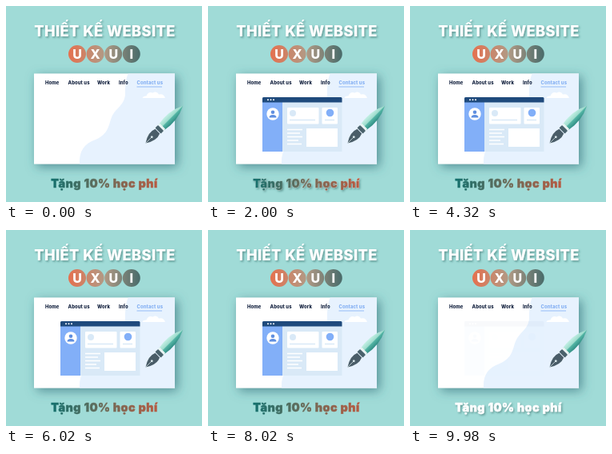
Write an HTML page that moves like this. It is 245 px wide and 245 px high and loops after 10000 ms.

```html
<!DOCTYPE html>
<html lang="vi">
<head>
<meta charset="utf-8">
<style>
  html, body { margin: 0; width: 100%; height: 100%; overflow: hidden; background: #a0dbd7; }
  svg { display: block; width: 100vw; height: 100vh; }
  text { font-family: Inter, "Open Sans", sans-serif; }
  .title { font-size: 18.2px; font-weight: 800; letter-spacing: .4px; fill: #fff; text-anchor: middle; }
  .offer { font-size: 14.3px; font-weight: 900; letter-spacing: .5px; stroke-width: .4; text-anchor: middle; }
  .nav { font-size: 5.9px; font-weight: 800; letter-spacing: .1px; fill: #14223f; }
  .badge { font-size: 16px; font-weight: 800; fill: #fff; text-anchor: middle; }
</style>
</head>
<body>
<svg viewBox="0 0 245 245">
  <defs>
    <linearGradient id="badgeFill" gradientUnits="userSpaceOnUse" x1="78" y1="0" x2="168" y2="0">
      <stop stop-color="#e5714f"/><stop offset=".5" stop-color="#b19a85"/><stop offset="1" stop-color="#486b6a"/>
    </linearGradient>
    <linearGradient id="offerFill" gradientUnits="userSpaceOnUse" x1="54" y1="0" x2="192" y2="0">
      <stop stop-color="#10706e"/><stop offset=".5" stop-color="#6d6b58"/><stop offset="1" stop-color="#b95a41"/>
    </linearGradient>
    <linearGradient id="penFill" x1="0" x2="1">
      <stop stop-color="#c4f0e5"/><stop offset=".45" stop-color="#9edccd"/>
      <stop offset=".55" stop-color="#54b5a5"/><stop offset="1" stop-color="#2f8c83"/>
    </linearGradient>
    <filter id="textShadow" x="-20%" y="-50%" width="140%" height="200%">
      <feDropShadow dx="1.4" dy="1.6" stdDeviation="1.1" flood-color="#23514f" flood-opacity=".5"/>
    </filter>
    <filter id="cardShadow" x="-20%" y="-25%" width="140%" height="150%">
      <feDropShadow dx="3.5" dy="3.5" stdDeviation="6.5" flood-color="#316f7c" flood-opacity=".7"/>
    </filter>
    <clipPath id="cardClip"><rect x="35" y="84.500" width="176" height="113"/></clipPath>
    <clipPath id="windowClip"><rect x="66" y="100" width="104" height="82.500"/></clipPath>
  </defs>

  <rect width="245" height="245" fill="#a0dbd7"/>
  <text class="title" x="123.500" y="38" filter="url(#textShadow)">THIẾT KẾ WEBSITE</text>
  <g id="badges"></g>

  <rect x="35" y="84.500" width="176" height="113" fill="#fff" filter="url(#cardShadow)"/>
  <g clip-path="url(#cardClip)">
    <path d="M92 198C91 181 98 172 112 167C128 160 128 150 132 139C137 127 149 124 149 109C149 98 150 90 153 84H211V198Z" fill="#e7f2fe"/>
    <path d="M170.500 115q1-3 5-2.500q2-6 8-4q5-2.500 7.500 2q6-1.500 8 4.500z" fill="#fff"/>
  </g>
  <g id="nav"></g>
  <path d="M163.500 101H195" stroke="#8cb5f4" stroke-width=".9"/>

  <g clip-path="url(#windowClip)">
    <g id="window">
      <rect x="68" y="114" width="99.500" height="68" fill="#d9e9f7"/>
      <rect x="68" y="120" width="25" height="62" fill="#82aff8"/>
      <path d="M68 120.500v-5q0-1.500 1.500-1.500h96.500q1.500 0 1.500 1.500v5z" fill="#1f4a7c"/>
      <g fill="#fff">
        <circle cx="75" cy="117.300" r="1"/><circle cx="78.500" cy="117.300" r="1"/><circle cx="82" cy="117.300" r="1"/>
        <circle cx="81" cy="135" r="7.700"/>
        <rect x="99" y="127" width="39.500" height="20.500" rx="1"/>
        <rect x="142.500" y="127" width="19.500" height="20.500" rx="1"/>
        <rect x="123" y="153" width="39" height="23"/>
      </g>
      <g fill="#5f8fe0">
        <circle cx="81" cy="132.800" r="2.300"/>
        <path d="M76.500 139.500q0-3.500 4.500-3.500t4.500 3.500z"/>
      </g>
      <circle cx="106" cy="134" r="4" fill="#d9e9f7"/>
      <path d="M102 142.500h32M146 142.500h12" stroke="#d9e9f7" stroke-width="1.500"/>
      <circle cx="152.500" cy="133.500" r="4.800" fill="#82aff8"/>
      <path d="M99 154.500h19M99 159h16M99 163.500h19M99 168h14M99 172.500h18" stroke="#fff" stroke-width="1.400"/>
    </g>
  </g>

  <g transform="translate(174.500 171.500) rotate(45)">
    <path d="M-5-28Q-9-48 0-66Q9-48 5-28Z" fill="url(#penFill)"/>
    <rect x="-5" y="-30" width="10" height="3" rx=".8" fill="#e9f4f3"/>
    <rect x="-5" y="-27" width="10" height="5" rx=".8" fill="#4a626c"/>
    <path d="M-4-21H4Q8-12 0 0Q-8-12-4-21Z" fill="#4a5d68"/>
    <path d="M0-10V0" stroke="#dceaed" stroke-width=".7"/>
    <circle cy="-11" r="1.400" fill="#dceaed"/>
  </g>

  <text id="offerWhite" class="offer" x="123" y="227" fill="#fff" stroke="#fff" filter="url(#textShadow)">Tặng 10% học phí</text>
  <text id="offerColor" class="offer" x="123" y="227" fill="url(#offerFill)" stroke="url(#offerFill)">Tặng 10% học phí</text>
</svg>
<script>
  const LOOP = 10000;
  const $ = selector => document.querySelector(selector);
  const clamp = x => Math.min(1, Math.max(0, x));
  const span = (t, from, to) => clamp((t - from) / (to - from));
  const smooth = x => x * x * (3 - 2 * x);

  $('#badges').innerHTML = [...'UXUI'].map((letter, i) => {
    const x = 89 + i * 22.6;
    return `<circle cx="${x}" cy="60" r="11" fill="url(#badgeFill)"/>
      <text class="badge" x="${x}" y="65.800">${letter}</text>`;
  }).join('');

  $('#nav').innerHTML = [['Home', 49], ['About us', 77.5], ['Work', 114], ['Info', 141], ['Contact us', 163.5]]
    .map(([label, x], i) => `<text class="nav" x="${x}" y="98"${i === 4 ? ' style="fill:#86b1f3"' : ''}>${label}</text>`)
    .join('');

  function render(t) {
    // The offer alternates between colour and white each second.
    const beat = t % 2000;
    const colored = beat < 1020;
    const blend = t >= 2000 && t < 2020;
    $('#offerColor').setAttribute('opacity', colored ? 1 : 0);
    $('#offerWhite').setAttribute('opacity', !colored || blend ? 1 : 0);

    // The window rises into the card, then fades before the loop restarts.
    const rise = smooth(Math.pow(span(t, 520, 1780), 1.6));
    $('#window').setAttribute('transform', `translate(0 ${69 * (1 - rise)})`);
    $('#window').setAttribute('opacity', 1 - 0.97 * span(t, 9850, 9980));
  }

  const start = performance.now();
  function tick() {
    render((performance.now() - start) % LOOP);
    requestAnimationFrame(tick);
  }
  render(0);
  requestAnimationFrame(tick);
</script>
</body>
</html>
```
